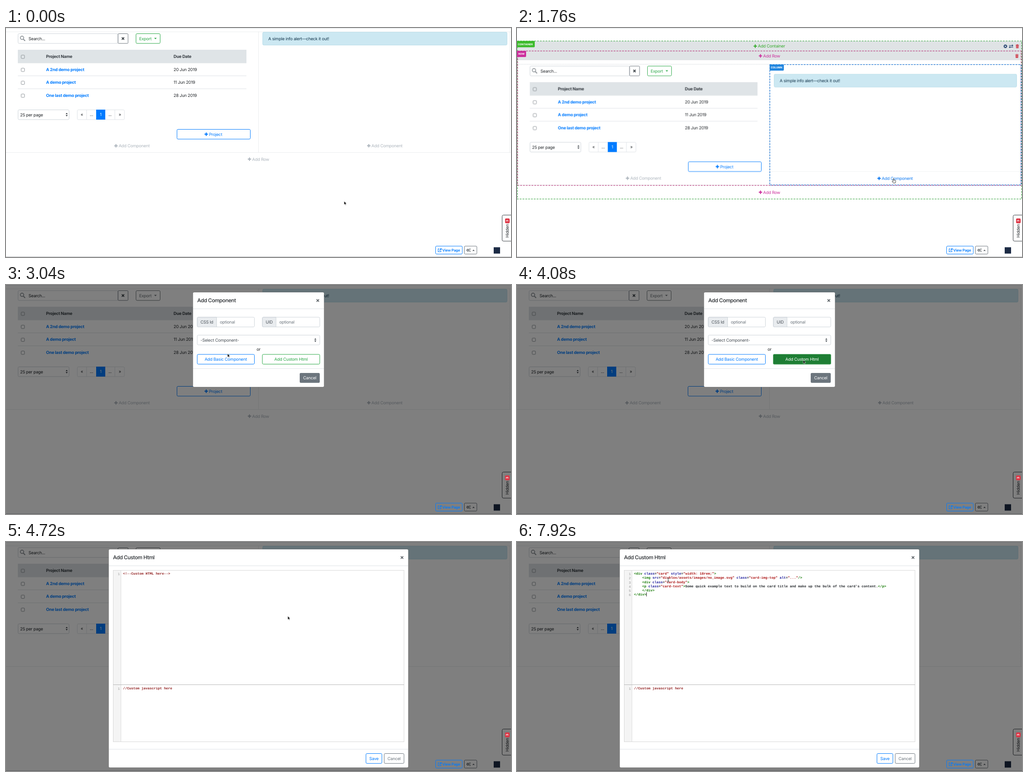
Animation, 1109 px wide and 505 px high, one loop 8 s. Source, as an HTML page:

```html
<!DOCTYPE html>
<html lang="en">
<head>
<meta charset="utf-8">
<title>Add component</title>
<style>
html, body { margin: 0; width: 100%; height: 100%; overflow: hidden; background: #fff; }
svg { display: block; width: 1109px; height: 505px; }
text {
  font: 9.24px Inter, Roboto, sans-serif; letter-spacing: -.24px; fill: #212529;
  text-rendering: geometricPrecision; white-space: pre;
}
rect, .line { fill: none; stroke-width: 1; }
.mid { text-anchor: middle; }
.b { font-weight: 700; }
.title { font-size: 11.55px; font-weight: 500; letter-spacing: -.4px; }
.tag { font-size: 5.6px; font-weight: 700; fill: #fff; letter-spacing: -.05px; }
.small { font-size: 8.1px; font-weight: 600; }
.muted { fill: #6c757d; }
.x { font-size: 13px; font-weight: 700; fill: #5a6065; }
.blue { fill: #007bff; }
.green { fill: #28a745; }
.ink { fill: currentColor; }
.sb { stroke: #007bff; }
.sg { stroke: #28a745; }
.sd { stroke: #6c757d; }
.sl { stroke: #ced4da; }
.rule { stroke: #dee2e6; }
.dash { stroke-width: 1.3; stroke-dasharray: 4 2.2; }
.code text {
  font: 700 7.5px "Liberation Mono", "Courier New", monospace; letter-spacing: 0;
}
.code .no { font-weight: 400; fill: #999; text-anchor: end; }
.code .c { fill: #912020; }
.t { fill: #170; } .a { fill: #1c1c9c; } .s { fill: #a11; }

/* One percent of the loop is 80 ms. */
.left, .alert, .right, .row, .box, .hover, .hot, .soft, .export, .shade, .m1, .m1 .body,
.press, .m2, .dim, .frame, .before, .after, .caret, .cursor, .arrow, .hand, .beam {
  animation: 8s linear infinite;
}
.left { animation-name: left; transform-origin: 536px 0; }
@keyframes left {
  0%, 5% { transform: none; }
  8%, 23% { transform: translateY(71.5px) scaleX(.996); }
  24%, 24.9% { transform: translateY(61.5px); }
  27%, to { transform: none; }
}
.alert { animation-name: alert; transform-origin: 563.5px 0; }
@keyframes alert {
  0%, 5% { transform: none; }
  8%, 23% { transform: translate(1px, 92.5px) scaleX(.9925); }
  24%, 24.9% { transform: translateY(80px); }
  27%, to { transform: none; }
}
.right { animation-name: right; }
@keyframes right {
  0%, 5% { transform: none; }
  8%, 23% { transform: translate(-1.5px, 72px); }
  24%, 24.9% { transform: translateY(61px); }
  27%, to { transform: none; }
}
.row { animation-name: row; }
@keyframes row {
  0%, 5% { transform: none; color: #adb5bd; }
  8%, 22.9% { transform: translateY(73px); color: #cc2e9c; }
  23% { transform: translateY(73px); color: #8d9398; }
  24%, 24.9% { transform: translateY(62px); color: #8d9398; }
  27%, to { transform: none; color: #adb5bd; }
}
.hot { animation-name: hot; animation-timing-function: step-end; }
@keyframes hot { 0%, to { color: #adb5bd; } 16% { color: #0b78f2; } 26% { color: #adb5bd; } }
.box { animation-name: box; animation-timing-function: step-end; }
@keyframes box { 0%, to { opacity: 0; } 23% { opacity: 1; } 26% { opacity: 0; } }
.hover { animation-name: hover; }
@keyframes hover { 0%, 6% { opacity: 0; } 8%, 22.9% { opacity: 1; } 23%, to { opacity: 0; } }
.soft { animation-name: soft; animation-timing-function: step-end; }
@keyframes soft { 0%, to { opacity: 1; } 24% { opacity: 0; } 25% { opacity: 1; } }
.export { animation-name: export; animation-timing-function: step-end; }
@keyframes export { 0%, to { color: #28a745; } 23% { color: #6a7075; } }

.shade { animation-name: shade; }
@keyframes shade {
  0%, 22.9% { opacity: 0; }
  23% { opacity: .1; }
  24%, 24.9% { opacity: .45; }
  26%, 52% { opacity: .5; }
  54%, 55% { opacity: .75; }
  59%, to { opacity: .5; }
}
.m1 { animation-name: m1; }
@keyframes m1 {
  0%, 25% { opacity: 0; transform: translateY(-50px); animation-timing-function: ease-out; }
  29%, 55% { opacity: 1; transform: none; }
  57%, to { opacity: 0; transform: none; }
}
.m1 .body { animation-name: fade; }
@keyframes fade {
  0%, 52% { opacity: 1; filter: grayscale(0); }
  54%, to { opacity: .6; filter: grayscale(.8); }
}
.press { animation-name: press; animation-timing-function: step-end; }
@keyframes press { 0%, to { opacity: 0; } 47% { opacity: 1; } }
.m2 { animation-name: m2; }
@keyframes m2 {
  0%, 52.99% { opacity: 0; transform: translateY(-30px); }
  53% { opacity: 1; transform: translateY(-30px); }
  54%, 54.9% { opacity: 1; transform: translateY(-17px); }
  56% { opacity: 1; transform: translateY(-4px); }
  58%, to { opacity: 1; transform: none; }
}
.dim { animation-name: dim; }
@keyframes dim { 0%, 55% { opacity: .34; } 59%, to { opacity: 0; } }
.frame { animation-name: frame; animation-timing-function: step-end; }
@keyframes frame { 0%, to { opacity: 1; } 53% { opacity: 0; } 56% { opacity: 1; } }
.before { animation-name: before; animation-timing-function: step-end; }
@keyframes before { 0%, to { opacity: 1; } 90% { opacity: 0; } }
.after { animation-name: after; animation-timing-function: step-end; }
@keyframes after { 0%, to { opacity: 0; } 90% { opacity: 1; } }
.caret { animation-name: caret; animation-timing-function: step-end; }
@keyframes caret { 0%, to { opacity: 1; } 92.5% { opacity: 0; } 97% { opacity: 1; } }

.cursor { animation-name: cursor; }
@keyframes cursor {
  0% { transform: translate(742.5px, 382px); }
  1% { transform: translate(742.5px, 382px); animation-timing-function: steps(5); }
  6% { transform: translate(775px, 300px); animation-timing-function: steps(8); }
  14% { transform: translate(815px, 325px); animation-timing-function: steps(6); }
  20% { transform: translate(826.5px, 332px); }
  30% { transform: translate(826.5px, 332px); animation-timing-function: steps(8); }
  38% { transform: translate(486.5px, 151.5px); animation-timing-function: steps(2); }
  40% { transform: translate(492px, 156px); animation-timing-function: steps(9); }
  49% { transform: translate(628.5px, 165.5px); }
  58% { transform: translate(628.5px, 165.5px); animation-timing-function: steps(10); }
  68% { transform: translate(530.5px, 145.5px); }
  75% { transform: translate(530.5px, 145.5px); animation-timing-function: steps(10); }
  85% { transform: translate(318px, 76px); animation-timing-function: steps(3); }
  88% { transform: translate(310px, 70px); animation-timing-function: steps(11); }
  99%, to { transform: translate(332px, 84px); }
}
.arrow { animation-name: arrow; animation-timing-function: step-end; }
@keyframes arrow { 0%, to { opacity: 1; } 16% { opacity: 0; } 23% { opacity: 1; } 76% { opacity: 0; } }
.hand { animation-name: hand; animation-timing-function: step-end; }
@keyframes hand { 0%, to { opacity: 0; } 16% { opacity: 1; } 23% { opacity: 0; } }
.beam { animation-name: beam; animation-timing-function: step-end; }
@keyframes beam { 0%, to { opacity: 0; } 76% { opacity: 1; } }
</style>
</head>
<body>
<svg viewBox="0 0 1109 505">
  <defs>
    <path id="plus" d="M0-1.1H2.6V-3.7H4.8V-1.1H7.4V1.1H4.8V3.7H2.6V1.1H0Z"/>
    <path id="sort" d="M-2.2-1 0-4 2.2-1ZM-2.2 1 0 4 2.2 1Z"/>
    <rect id="check" x="-3.7" y="-3.7" width="7.4" height="7.4" rx="1.4" stroke="#8d9398"/>
    <g id="trash" fill="#c9303e">
      <path d="M-3.6-3.4H-1.4L-.9-4.2H.9L1.4-3.4H3.6V-2.4H-3.6Z"/>
      <path d="M-3-1.7H3L2.6 4.2H-2.6Z"/>
      <path d="M-1.2-.6V3.2M1.2-.6V3.2" stroke="#fff" stroke-width=".6"/>
    </g>
    <g id="gear">
      <circle r="2.5" fill="none" stroke="currentColor" stroke-width="1.7"/>
      <circle r="3.6" fill="none" stroke="currentColor" stroke-width="1.2" stroke-dasharray="1.4 1.427"/>
    </g>
  </defs>

  <!-- page -->
  <path class="line" d="M0 .5H1109" stroke="#dcdfe2"/>
  <path class="line" d="M0 504.5H1109" stroke="#b9bcbf"/>
  <g class="left">
    <path class="line soft" d="M0 8.5H1109M0 274.5H1109M554.5 8.5V274.5M1106.5 8.5V274.5" stroke="#d8dcdf" stroke-dasharray="1.2 1.2" stroke-width=".8"/>
    <g class="soft">
      <rect class="sl" x="26.5" y="12.5" width="219.5" height="21.5" rx="2.3"/>
      <circle cx="35.2" cy="21.6" r="3.7" fill="none" stroke="#8d9398" stroke-width="1.7"/>
      <path d="M38 24.5 42 28.5" stroke="#8d9398" stroke-width="2.1"/>
      <rect x="26" y="48.5" width="502" height="28.7" style="fill:#dfe4e7"/>
      <path class="line rule" d="M26 48.5H528M26 77H528M26 105.5H528M26 134H528"/>
      <use href="#check" x="37" y="63.5"/>
      <use href="#check" x="37" y="92.3"/>
      <use href="#check" x="37" y="120.8"/>
      <use href="#check" x="37" y="149.3"/>
      <rect class="sl" x="26.5" y="180.5" width="112" height="21.5" rx="2.3"/>
      <rect class="rule" x="156.5" y="180.5" width="103.5" height="21.5" rx="2.3"/>
      <path class="line rule" d="M177 180.5V202M239 180.5V202"/>
    </g>
    <text x="49.5" y="26.5" fill="#495057">Search...</text>
    <rect class="sd" x="246" y="12.5" width="22" height="21.5" rx="1.5"/>
    <path d="M254.3 20.6 259.5 25.8M259.5 20.6 254.3 25.8" stroke="#343a40" stroke-width="1.8"/>
    <g class="export">
      <rect x="285.5" y="12.5" width="53" height="21.5" rx="2.3" stroke="currentColor"/>
      <text class="ink" x="292.5" y="26.5">Export</text>
      <path class="ink" d="M325.4 21.8H331L328.2 24.8Z"/>
    </g>
    <text class="b" x="88" y="66" style="fill:#343a40">Project Name</text>
    <text class="b" x="368" y="66" style="fill:#343a40">Due Date</text>
    <text class="b blue" x="88" y="95">A 2nd demo project</text>
    <text class="b blue" x="88" y="123.3">A demo project</text>
    <text class="b blue" x="88" y="151.6">One last demo project</text>
    <text x="368" y="95">20 Jun 2019</text>
    <text x="368" y="123.3">11 Jun 2019</text>
    <text x="368" y="151.6">28 Jun 2019</text>
    <text x="31" y="194.5">25 per page</text>
    <use href="#sort" x="133.3" y="191" fill="#343a40"/>
    <rect x="198" y="180" width="20" height="22" style="fill:#007bff"/>
    <text class="mid" x="166.5" y="194.3">«</text>
    <text class="mid" x="187.7" y="194.3">...</text>
    <text class="mid" x="208" y="194.3" style="fill:#fff">1</text>
    <text class="mid" x="228.3" y="194.3">...</text>
    <text class="mid" x="250" y="194.3">»</text>
    <rect class="sb" x="375.5" y="223.5" width="161" height="21.5" rx="2.3"/>
    <use class="blue" href="#plus" x="436" y="234.2"/>
    <text class="blue" x="445.7" y="237.6">Project</text>
    <g class="soft" color="#adb5bd">
      <use class="ink" href="#plus" x="237.8" y="259.8"/>
      <text class="ink" x="247.4" y="263.1">Add Component</text>
    </g>
  </g>
  <g class="alert">
    <rect class="soft" x="563.8" y="9.2" width="536.4" height="28.5" rx="2.3" style="fill:#cce8f2" stroke="#b5dce8"/>
    <text x="576" y="26.6" style="fill:#12344a">A simple info alert—check it out!</text>
  </g>
  <g class="right">
    <rect class="box" x="555" y="9" width="553.5" height="265.5" stroke="#1f4a86" stroke-dasharray="1.4 1.4"/>
    <g class="hot">
      <use class="ink" href="#plus" x="793" y="259.6"/>
      <text class="ink" x="802.6" y="263">Add Component</text>
    </g>
  </g>
  <g class="row">
    <use class="ink" href="#plus" x="531" y="289.2"/>
    <text class="ink" x="540.6" y="292.6">Add Row</text>
  </g>

  <!-- hover outlines -->
  <g class="hover">
    <path d="M0 29H1109V71H0Z" fill="#dfe3e5"/>
    <path class="line" d="M2 80H555M556 316.5H1106" stroke="#e4e7ea" stroke-dasharray="1.2 1.2"/>
    <rect class="dash" x=".7" y="28.7" width="1107.6" height="348.4" stroke="#4fae57"/>
    <rect class="dash" x="1.4" y="50.6" width="1105.8" height="296.6" stroke="#b8407f"/>
    <rect class="dash" x="555.3" y="80.6" width="551.6" height="265.6" stroke="#1b76d6"/>
    <path d="M0 28.5H39V40.5Q39 42.5 37 42.5H0Z" fill="#3dbb2c"/>
    <text class="tag" x="2" y="37.6">CONTAINER</text>
    <path d="M0 50.5H20V62Q20 64 18 64H0Z" fill="#cc2e9c"/>
    <text class="tag" x="3" y="59.2">ROW</text>
    <path d="M555 80.5H586V92Q586 94 584 94H555Z" fill="#2387e0"/>
    <text class="tag" x="557.5" y="89.3">COLUMN</text>
    <g color="#36ab2e">
      <use class="ink" href="#plus" x="519.5" y="40"/>
      <text class="ink" x="529" y="43.4">Add Container</text>
    </g>
    <g color="#cc2e9c">
      <use class="ink" href="#plus" x="531" y="61.5"/>
      <text class="ink" x="540.6" y="64.9">Add Row</text>
    </g>
    <use href="#gear" x="1072.5" y="40.3" color="#1c3d6b"/>
    <path d="M1080.5 38.5H1088M1081.5 42.2H1089.5" stroke="#1c3d6b" stroke-width="1.2"/>
    <path d="M1087 36.3 1090 38.5 1087 40.7ZM1083 40 1080 42.2 1083 44.4Z" fill="#1c3d6b"/>
    <use href="#trash" x="1098.7" y="40.3"/>
    <use href="#trash" x="1097.8" y="61.7"/>
  </g>

  <!-- fixed tools -->
  <path d="M1110 412.5H1092.5Q1089.5 412.5 1089.5 415.5V467Q1089.5 470 1092.5 470H1110" fill="#fff" stroke="#343a40"/>
  <text class="mid" transform="translate(1104 447.3) rotate(-90)">Hidden</text>
  <rect x="1006.5" y="481" width="27.5" height="17.5" rx="2" stroke="#6c757d" style="fill:#fff"/>
  <g color="#4b5258">
    <use href="#gear" transform="translate(1014.3 490) scale(.75)"/>
    <use href="#gear" transform="translate(1018.7 487.6) scale(.4)"/>
    <use href="#gear" transform="translate(1018.7 492.4) scale(.4)"/>
    <path class="ink" d="M1024.2 491.4H1029.2L1026.7 488.7Z"/>
  </g>
  <rect x="1071" y="483.5" width="14" height="14" style="fill:#1c2b45"/>

  <rect class="shade" width="1109" height="505" style="fill:#000"/>

  <rect class="sb" x="943.5" y="481" width="58.5" height="17.5" rx="2"/>
  <path d="M952 487H949V493.5H955V490.5M951.6 491 955.6 487" fill="none" stroke="#007bff" stroke-width="1.1"/>
  <path d="M952.8 486H956.6V489.8Z" fill="#007bff"/>
  <text class="small blue" x="958" y="492.9">View Page</text>
  <rect x="1096" y="420" width="10" height="10.5" rx="2" style="fill:#dc3545"/>
  <text class="tag mid" transform="translate(1103.3 425.3) rotate(-90)" style="font-size:7px">3</text>

  <!-- custom html dialog -->
  <g class="m2">
    <rect x="225.5" y="16" width="658" height="481.5" rx="2.7" style="fill:#fff" stroke="#0003"/>
    <text class="title" x="235" y="38">Add Custom Html</text>
    <text class="x mid" x="869.5" y="38.2">×</text>
    <g class="frame">
      <path class="line rule" d="M226 52.5H883M226 457H883"/>
      <rect x="235.5" y="62.5" width="17" height="378" style="fill:#f4f4f4"/>
      <path class="line" d="M252.5 62.5V440.5" stroke="#ddd"/>
      <rect x="235.5" y="62.5" width="638.5" height="378" stroke="#d8d8d8"/>
      <path class="line" d="M235 314.7H874" stroke="#b4b4b4"/>
    </g>
    <g class="code">
      <text class="no" x="250" y="73">1</text>
      <text class="no" x="250" y="325.8">1</text>
      <text class="c" x="257" y="325">//Custom javascript here</text>
      <text class="c before" x="257" y="72">&lt;!--Custom HTML here--&gt;</text>
      <g class="after">
        <text class="no"><tspan x="250" y="82.2">2</tspan><tspan x="250" y="91.5">3</tspan><tspan x="250" y="100.7">4</tspan><tspan x="250" y="109.9">5</tspan><tspan x="250" y="119.2">6</tspan></text>
        <text x="257" y="72"><tspan class="t">&lt;div</tspan> <tspan class="a">class</tspan>=<tspan class="s">"card"</tspan> <tspan class="a">style</tspan>=<tspan class="s">"width: 18rem;"</tspan><tspan class="t">&gt;</tspan></text>
        <text x="275" y="81.2"><tspan class="t">&lt;img</tspan> <tspan class="a">src</tspan>=<tspan class="s">"divblox/assets/images/no_image.svg"</tspan> <tspan class="a">class</tspan>=<tspan class="s">"card-img-top"</tspan> <tspan class="a">alt</tspan>=<tspan class="s">"..."</tspan><tspan class="t">/&gt;</tspan></text>
        <text x="275" y="90.5"><tspan class="t">&lt;div</tspan> <tspan class="a">class</tspan>=<tspan class="s">"card-body"</tspan><tspan class="t">&gt;</tspan></text>
        <text x="275" y="99.7"><tspan class="t">&lt;p</tspan> <tspan class="a">class</tspan>=<tspan class="s">"card-text"</tspan><tspan class="t">&gt;</tspan>Some quick example text to build on the card title and make up the bulk of the card's content.<tspan class="t">&lt;/p&gt;</tspan></text>
        <text class="t" x="275" y="108.9" style="fill:#170">&lt;/div&gt;</text>
        <text class="t" x="257" y="118.2" style="fill:#170">&lt;/div&gt;</text>
        <path class="caret" d="M284.4 111V120" stroke="#000" stroke-width=".9"/>
      </g>
    </g>
    <rect class="sb" x="790.5" y="466.5" width="35" height="21.8" rx="2.3"/>
    <text class="mid blue" x="808" y="480.8">Save</text>
    <rect class="sd" x="830.5" y="466.5" width="43.5" height="21.8" rx="2.3"/>
    <text class="mid muted" x="852.2" y="480.8">Cancel</text>
    <rect class="dim" x="225.5" y="16" width="658" height="481.5" rx="2.7" style="fill:#000"/>
  </g>

  <!-- component dialog -->
  <g class="m1">
    <rect x="410.5" y="16" width="288" height="209" rx="2.7" style="fill:#fff" stroke="#0003"/>
    <g class="body">
      <text class="title" x="420" y="38">Add Component</text>
      <text class="x mid" x="684.5" y="38.2">×</text>
      <path class="line rule" d="M411 52.5H698M411 184.2H698"/>
      <path class="sl" d="M462.5 71H422Q420 71 420 73V90.5Q420 92.5 422 92.5H462.5ZM593 71H565Q563 71 563 73V90.5Q563 92.5 565 92.5H593Z" fill="#e9ecef"/>
      <rect class="sl" x="420" y="71" width="125.5" height="21.5" rx="2.3"/>
      <rect class="sl" x="563" y="71" width="126" height="21.5" rx="2.3"/>
      <text x="427" y="85.2" style="fill:#495057">CSS Id</text>
      <text class="muted" x="469.7" y="85.2">optional</text>
      <text x="570.3" y="85.2" style="fill:#495057">UID</text>
      <text class="muted" x="600.3" y="85.2">optional</text>
      <rect class="sl" x="420" y="110.5" width="269" height="21.5" rx="2.3"/>
      <text x="427" y="124.7" style="fill:#495057">-Select Component-</text>
      <use href="#sort" x="679.3" y="121.5" fill="#343a40"/>
      <text class="mid" x="554.5" y="145.3">or</text>
      <rect class="sb" x="420" y="153" width="125.5" height="21.5" rx="2.3"/>
      <text class="mid blue" x="482.6" y="167.2">Add Basic Component</text>
      <rect class="sg" x="563" y="153" width="126" height="21.5" rx="2.3"/>
      <text class="mid green" x="626" y="167.2">Add Custom Html</text>
      <g class="press">
        <rect x="562.5" y="152.5" width="127" height="22.5" rx="2.5" style="fill:#1e7e34" stroke="#7fc08f"/>
        <text class="mid" x="626" y="167.2" style="fill:#fff">Add Custom Html</text>
      </g>
      <rect x="645" y="194" width="44" height="21.7" rx="2.3" style="fill:#6c757d"/>
      <text class="mid" x="667" y="208.2" style="fill:#fff">Cancel</text>
    </g>
  </g>

  <g class="cursor">
    <path class="arrow" d="M0 0V7.6L1.8 6 3 8.8 4.3 8.2 3.1 5.5H5.5Z" fill="#000" stroke="#fff" stroke-width=".6"/>
    <path class="hand" d="M-.6.6Q.4-.4 1.2.6L1.8 3.6 4.6 4.2Q5.3 4.6 5 6.4L4.3 9.8H-.2L-2.6 6.4Q-2.7 5.2-1.4 5.6L-.2 6.4Z" fill="#fff" stroke="#222" stroke-width=".9"/>
    <path class="beam" d="M-1.8-4.4Q0-4.4 0-3.2Q0-4.4 1.8-4.4M0-3.4V3.4M-1.8 4.4Q0 4.4 0 3.2Q0 4.4 1.8 4.4M-1 1.6H1" fill="none" stroke="#222" stroke-width=".9"/>
  </g>
</svg>
</body>
</html>
```
